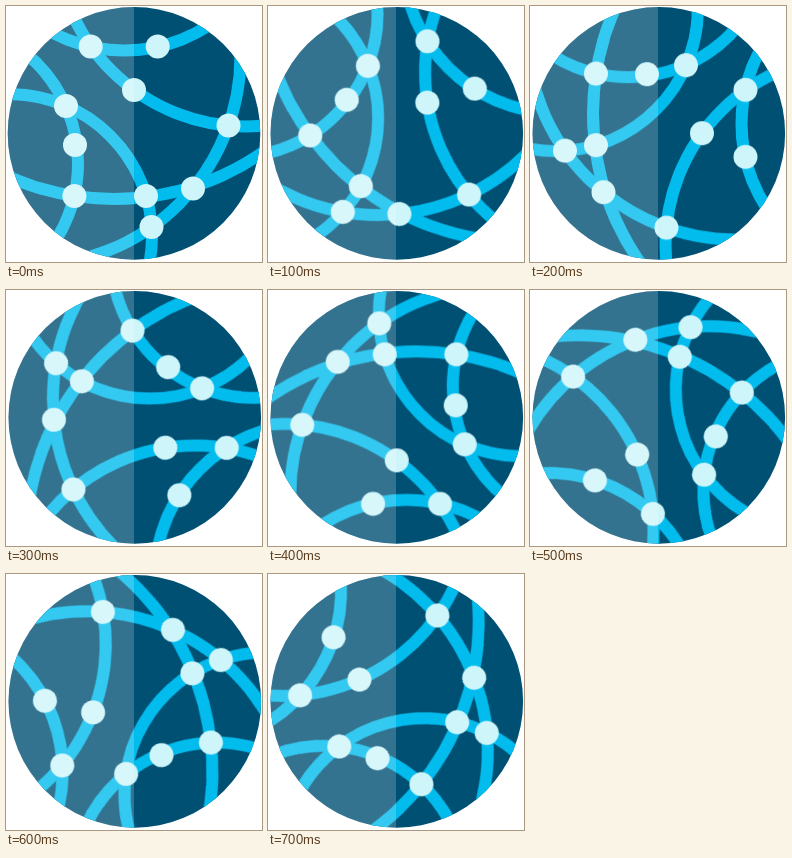
Animation, 256 px wide and 256 px high, one loop 0.8 s. Source, as an HTML page:

```html
<!DOCTYPE html>
<html lang="en">
<head>
<meta charset="utf-8">
<title>Turning network globe</title>
<style>
html, body { margin: 0; width: 100%; height: 100%; overflow: hidden; background: #fff; }
svg { display: block; width: 100vw; height: 100vh; }
.nudge { animation: nudge 800ms step-end infinite; }
.web { transform-origin: 128px 127.2px; animation: turn 800ms step-end infinite; }
.strands { fill: none; stroke: #02bcee; stroke-width: 12; }
.nodes { fill: #cdf5fa; }
.nodes circle { r: 12px; }
@keyframes nudge {
  0% { transform: none; }
  12.5%, 100% { transform: translateX(.8px); }
}
/* 24 poses of 15 degrees, thinned to 8 steps */
@keyframes turn {
  0% { transform: rotate(0deg); }
  12.5% { transform: rotate(45deg); }
  25% { transform: rotate(90deg); }
  37.5% { transform: rotate(135deg); }
  50% { transform: rotate(180deg); }
  62.5% { transform: rotate(210deg); }
  75% { transform: rotate(255deg); }
  87.5%, 100% { transform: rotate(300deg); }
}
</style>
</head>
<body>
<svg viewBox="0 0 256 256">
  <clipPath id="disc"><circle class="nudge" cx="128" cy="127.4" r="126.3"/></clipPath>
  <g clip-path="url(#disc)">
    <rect width="256" height="256" fill="#005073"/>
    <g class="nudge">
      <g class="web">
        <!-- each strand is the part of a large ring that crosses the disc -->
        <g class="strands">
          <circle cx="118.5" cy="-110.5" r="155"/>
          <circle cx="240" cy="-69.5" r="190"/>
          <circle cx="24.5" cy="49.4" r="210"/>
          <circle cx="4" cy="230.3" r="142"/>
          <circle cx="-71" cy="157.7" r="143"/>
          <circle cx="108" cy="-68" r="261"/>
        </g>
        <g class="nodes">
          <circle cx="84.7" cy="40.5"/>
          <circle cx="151.7" cy="40.5"/>
          <circle cx="128" cy="84"/>
          <circle cx="60" cy="100"/>
          <circle cx="69" cy="139"/>
          <circle cx="68.4" cy="190"/>
          <circle cx="140" cy="190"/>
          <circle cx="187" cy="182.5"/>
          <circle cx="145.5" cy="221"/>
          <circle cx="222.5" cy="119.5"/>
        </g>
      </g>
    </g>
    <rect width="128" height="256" fill="#fff" opacity=".2"/>
  </g>
</svg>
</body>
</html>
```
